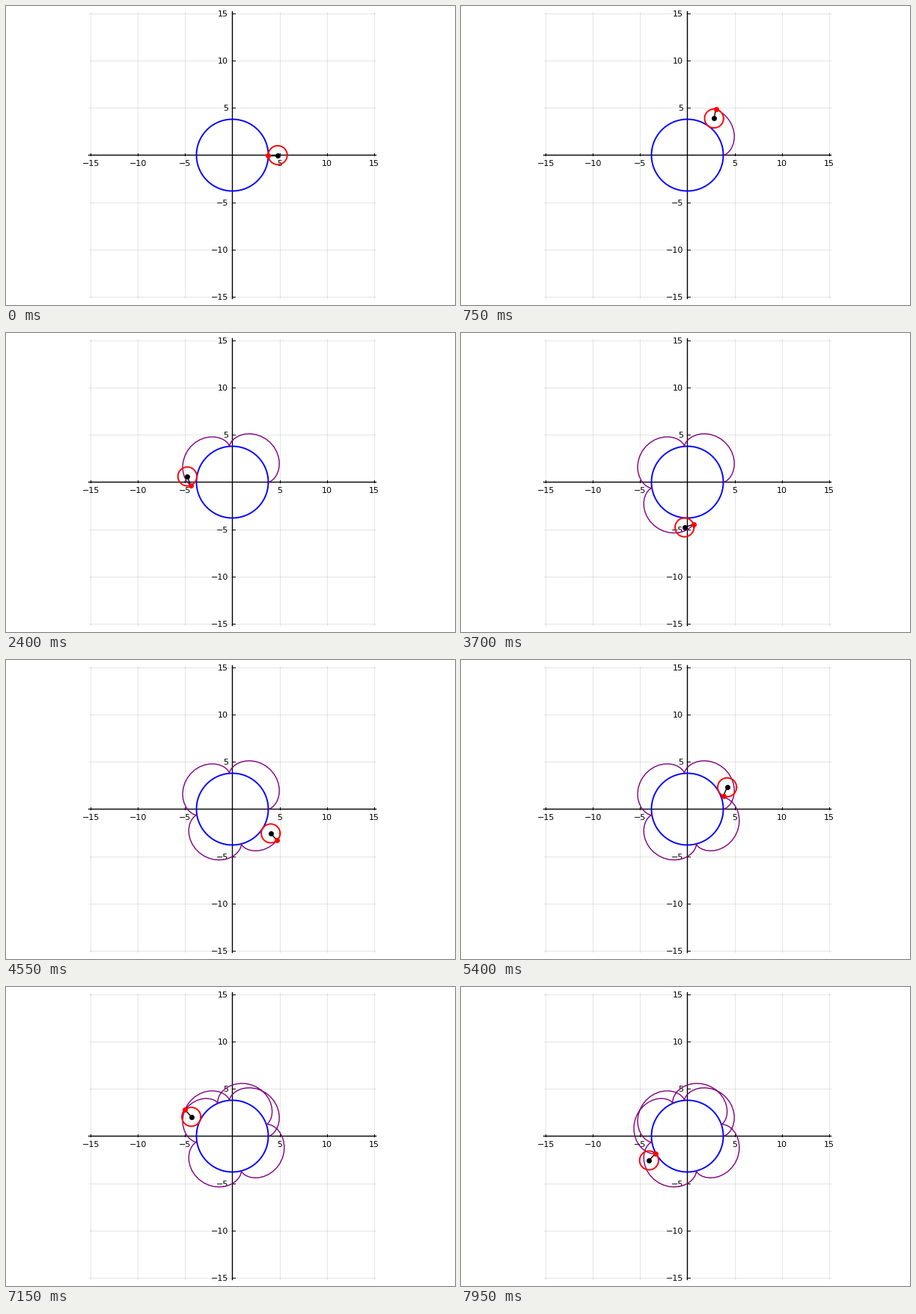
Recreate the animation shown at these times as a matplotlib script. Size 600 px wide and 400 px high, loop 8000 ms.

```python
import numpy as np
import matplotlib.pyplot as plt
from matplotlib.animation import FuncAnimation

W, H, DPI = 600, 400, 100
PX = 72 / DPI               # points per pixel
CX, CY, SCALE = 302.5, 199.5, 12.63
R, r = 3.8, 1.0             # fixed and rolling circle
STEP = 2 * np.pi / 100
FRAMES, INTERVAL = 160, 50
REACH = 15.2
TICKS = [-15, -10, -5, 5, 10, 15]

plt.rcParams["font.family"] = "DejaVu Sans"
fig = plt.figure(figsize=(W / DPI, H / DPI), dpi=DPI, facecolor="white")
ax = fig.add_axes([0, 0, 1, 1])
ax.set_xlim(-CX / SCALE, (W - CX) / SCALE)
ax.set_ylim((CY - H) / SCALE, CY / SCALE)
ax.axis("off")


def line(x, y, color, width, z, **kw):
    return ax.plot(x, y, color=color, lw=width * PX, zorder=z, **kw)[0]


def dot(color, z):
    return ax.plot([], [], "o", color=color, ms=7 * PX, mew=0, zorder=z)[0]


def label(value, xy, dx, dy, ha):
    text = str(value).replace("-", "\u2212")
    ax.annotate(text, xy, (dx * PX, dy * PX), textcoords="offset points",
                ha=ha, va="baseline", fontsize=8, zorder=3)


span = [-REACH, REACH]
tick = [0, 3 / SCALE]
for v in TICKS:
    line([v, v], span, "black", 1, 1, alpha=0.1)
    line(span, [v, v], "black", 1, 1, alpha=0.1)
    line([v, v], tick, "black", 1, 2)
    line(tick, [v, v], "black", 1, 2)
    label(v, (v, 0), 0, -14.5, "center")
    label(v, (0, v), -5.5, -4, "right")
line(span, [0, 0], "black", 1.4, 2, snap=False)
line([0, 0], span, "black", 1.4, 2, snap=False)

turn = np.linspace(0, 2 * np.pi, 201)
line(R * np.cos(turn), R * np.sin(turn), "blue", 1.9, 4)
trail = line([], [], "purple", 1.4, 5)
wheel = line([], [], "red", 1.9, 6)
arm = line([], [], "black", 1.4, 7)
hub = dot("black", 8)
pen = dot("red", 9)

angle = STEP * np.arange(FRAMES)
hub_x, hub_y = (R + r) * np.cos(angle), (R + r) * np.sin(angle)
spin = (R + r) / r * angle
pen_x, pen_y = hub_x - r * np.cos(spin), hub_y - r * np.sin(spin)


def update(i):
    trail.set_data(pen_x[:i + 1], pen_y[:i + 1])
    wheel.set_data(hub_x[i] + r * np.cos(turn), hub_y[i] + r * np.sin(turn))
    arm.set_data([hub_x[i], pen_x[i]], [hub_y[i], pen_y[i]])
    hub.set_data([hub_x[i]], [hub_y[i]])
    pen.set_data([pen_x[i]], [pen_y[i]])
    return trail, wheel, arm, hub, pen


anim = FuncAnimation(fig, update, frames=FRAMES, interval=INTERVAL,
                     repeat=True, repeat_delay=0)
plt.show()
```
